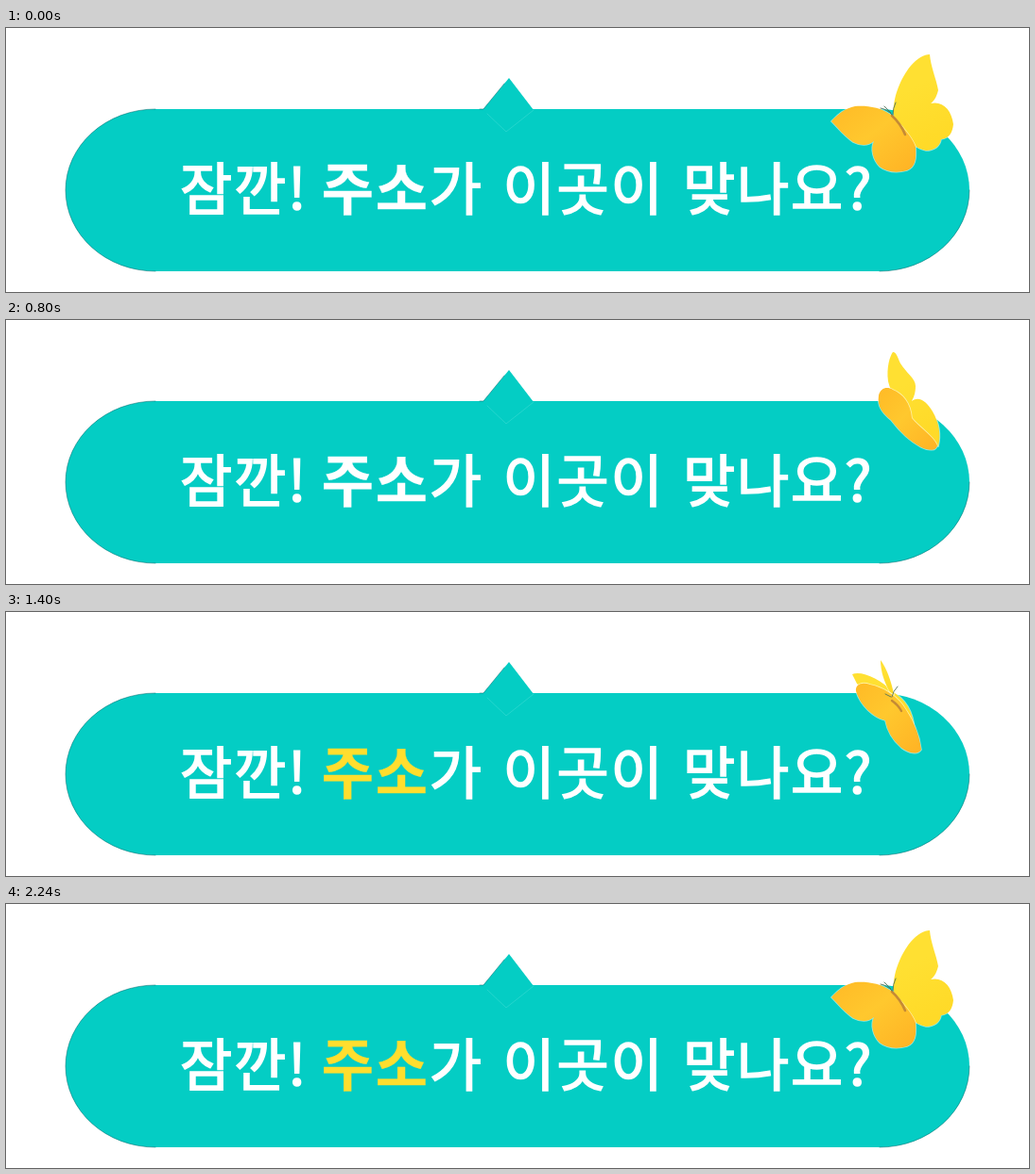
Write an HTML page that moves like this. It is 1082 by 280 pixels and loops after 2400 ms.

```html
<!DOCTYPE html>
<html lang="ko">
<head>
<meta charset="utf-8">
<title>주소 확인</title>
<style>
  html, body { margin: 0; width: 100%; height: 100%; overflow: hidden; background: #fff; }
  svg { display: block; width: 1082px; height: 280px; }

  text {
    font: 400 60px "Noto Sans CJK KR", "Noto Sans CJK", sans-serif;
    letter-spacing: 1.8px;
    fill: #fff;
    stroke: #fff;
    stroke-width: 1.7px;
  }
  .key { font-weight: 700; stroke-width: .3px; animation: blink 800ms step-end infinite; }
  @keyframes blink {
    0% { fill: #fff; stroke: #fff; }
    50% { fill: #ffde2e; stroke: #ffde2e; }
  }

  .wing { stroke: #fff; stroke-opacity: .55; stroke-width: 1.6px; paint-order: stroke; }
  .thin { fill: none; stroke-linecap: round; }

  .pose { opacity: 0; animation: 2400ms step-end infinite; }
  .open { animation-name: open; }
  .half { animation-name: half; }
  .shut { animation-name: shut; }
  .side { animation-name: side; }
  @keyframes open {
    0%, 50%, 83.3333% { opacity: 1; }
    16.6667%, 58.3333% { opacity: 0; }
  }
  @keyframes half {
    0%, 33.3333% { opacity: 0; }
    16.6667% { opacity: 1; }
  }
  @keyframes shut {
    0%, 50%, 83.3333% { opacity: 0; }
    33.3333%, 66.6667% { opacity: 1; }
  }
  @keyframes side {
    0%, 66.6667% { opacity: 0; }
    58.3333% { opacity: 1; }
  }
</style>
</head>
<body>
<svg viewBox="0 0 1082 280">
  <defs>
    <linearGradient id="lemon" x1="0" y1="0" x2=".3" y2="1">
      <stop offset=".4" stop-color="#ffe032"/>
      <stop offset="1" stop-color="#ffda28"/>
    </linearGradient>
    <linearGradient id="amber" x1="0" y1="0" x2="1" y2="1">
      <stop offset="0" stop-color="#ffba26"/>
      <stop offset=".45" stop-color="#ffc82e"/>
      <stop offset="1" stop-color="#ffb224"/>
    </linearGradient>
  </defs>

  <!-- Speech bubble -->
  <g fill="#04cdc4">
    <rect x="63" y="86" width="956" height="172" rx="95" ry="86"/>
    <path d="M504 87L532 53L558 87L529 110Z"/>
  </g>
  <g class="thin" stroke="#0b6f70" stroke-opacity=".6" stroke-width=".9">
    <path d="M158 86A95 86 0 0 0 158 258M924 258A95 86 0 0 0 1019 172"/>
    <path d="M501 86H505L527 59"/>
  </g>
  <path class="thin" d="M509 91L529 110L558 87" stroke="#3fdcd4" stroke-opacity=".7" stroke-width=".8"/>

  <text y="192.5">
    <tspan x="184">잠깐!</tspan>
    <tspan x="333.7" class="key">주소</tspan><tspan>가</tspan>
    <tspan x="525.5">이곳이</tspan>
    <tspan x="716">맞나요?</tspan>
  </text>

  <!-- Butterfly -->
  <g class="pose open">
    <path class="wing" fill="url(#lemon)" d="M939 93C937 74 947 52 957 40C964 32 971 28 977 28C978 41 984 54 986 66C984 74 981 78 978 80C991 77 1000 87 1002 102C1001 112 997 117 989 118C988 126 981 130 973 130C960 127 947 116 939 93Z"/>
    <path class="wing" fill="url(#amber)" d="M936 92C925 84 910 82 898 83C888 85 880 91 873 99C880 106 887 115 896 121C904 125 912 125 918 120C914 128 917 140 924 147C932 153 942 154 953 151C962 148 963 138 962 126C958 115 948 104 936 92Z"/>
    <path class="thin" stroke="#c58a35" stroke-width="2.6" d="M937 93Q946 101 951 113"/>
    <path class="thin" stroke="#53735a" stroke-width=".9" d="M937 92Q932 86 925 85M938 92Q938 85 941 79M936 90L929 83"/>
  </g>

  <g class="pose half">
    <path class="wing" fill="url(#lemon)" d="M939 93C936 75 950 42 962 31C968 25 974 24 977 26C978 40 981 53 982 64C980 72 974 76 971 78C982 78 990 88 992 104C991 115 985 118 980 118C978 128 972 134 966 135C955 128 945 110 939 93Z"/>
    <path class="wing" fill="url(#amber)" d="M893 91C897 80 905 78 915 82C928 85 938 92 945 101C955 113 965 130 966 146C964 153 958 154 952 152C942 148 933 135 930 119C922 124 912 124 905 117C897 109 891 100 893 91Z"/>
    <path class="thin" stroke="#d98d25" stroke-width="1.4" d="M938 94Q953 108 961 126"/>
    <path class="thin" stroke="#53735a" stroke-width=".9" d="M938 93Q935 85 941 78"/>
  </g>

  <g class="pose shut">
    <path class="wing" fill="url(#lemon)" d="M938 34C942 34 943 40 946 46C952 56 962 62 962 70C962 78 960 82 958 86C966 80 974 87 980 97C987 109 989 122 986 134C974 130 960 116 953 100C948 90 936 80 933 65C931 50 935 38 938 34Z"/>
    <path class="wing" fill="url(#amber)" d="M923 80C925 72 932 70 938 74C948 78 957 88 958 104C966 114 980 122 985 133C984 139 976 139 968 135C955 128 945 118 936 106C928 100 921 92 923 80Z"/>
  </g>

  <g class="pose side">
    <path class="wing" fill="url(#lemon)" d="M895 66C905 62 925 71 937 84C952 93 959 105 961 124L930 96C918 88 905 82 900 76Z"/>
    <path class="wing" fill="url(#lemon)" d="M925 51C931 59 936 72 939 87L935 85C929 75 925 63 925 51Z"/>
    <path class="wing" fill="url(#amber)" d="M899 84C898 76 906 74 914 77C928 80 940 88 948 98C958 112 966 128 968 146C964 152 955 150 947 144C937 135 932 126 930 115C918 112 904 100 899 84Z"/>
    <path class="thin" stroke="#c58a35" stroke-width="2.4" d="M937 94Q944 99 947 105"/>
    <path class="thin" stroke="#53735a" stroke-width=".9" d="M937 90Q938 84 943 79M936 90L930 87"/>
  </g>
</svg>
</body>
</html>
```
